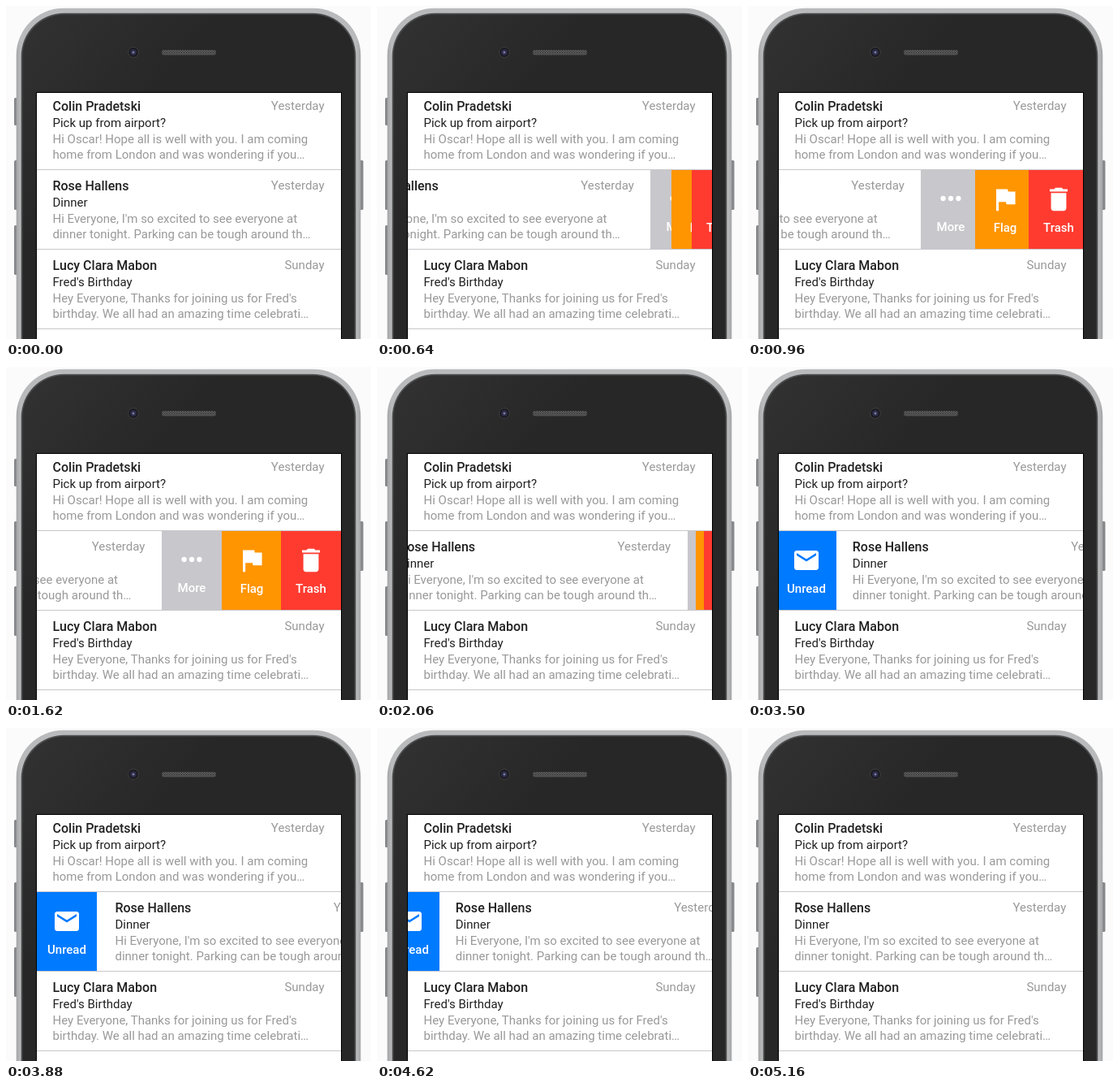
An HTML page that plays this animation: 450 by 410 pixels, repeating every 5.96 s.

```html
<!DOCTYPE html>
<html lang="en">
<head>
<meta charset="utf-8">
<title>Swipe actions</title>
<style>
html, body { margin: 0; width: 100%; height: 100%; overflow: hidden; background: #fbfbfb; }
svg { display: block; width: 450px; height: 410px; font: 15px Roboto, sans-serif; }
.name { font-size: 16px; font-weight: 500; fill: #212121; }
.subject { fill: #212121; }
.body, .date { fill: #999; }
.date { text-anchor: end; }
.label { font-weight: 500; fill: #fff; text-anchor: middle; }
</style>
</head>
<body>
<svg viewBox="0 0 450 410">
  <defs>
    <clipPath id="screen"><rect x="38" y="107" width="375" height="303"/></clipPath>
    <clipPath id="swipe"><rect x="38" y="202" width="375" height="97"/></clipPath>
    <linearGradient id="metal" x2="1" y2="0">
      <stop offset="0" stop-color="#a4a5a7"/>
      <stop offset=".012" stop-color="#b9babb"/>
      <stop offset=".988" stop-color="#b9babb"/>
      <stop offset="1" stop-color="#a4a5a7"/>
    </linearGradient>
    <linearGradient id="face" x2=".6" y2=".6">
      <stop offset="0" stop-color="#323232"/>
      <stop offset=".5" stop-color="#272727"/>
    </linearGradient>
    <pattern id="mesh" width="3" height="3" patternUnits="userSpaceOnUse">
      <rect width="3" height="3" fill="#585858"/>
      <path d="M0 0h1v1h-1zM1.5 1.5h1v1h-1z" fill="#2c2c2c"/>
    </pattern>
  </defs>
  <g fill="#85878a">
    <rect x="10" y="113" width="5" height="34" rx="1.5"/>
    <rect x="10" y="190" width="5" height="61" rx="1.5"/>
    <rect x="10" y="270" width="5" height="61" rx="1.5"/>
    <rect x="435" y="190" width="5.5" height="61" rx="1.5"/>
  </g>
  <rect x="12.7" y="2.8" width="424.6" height="480" rx="58" fill="url(#metal)"/>
  <rect x="18.7" y="8.7" width="412.6" height="480" rx="53" fill="#4a4b4c"/>
  <rect x="20.5" y="10.5" width="409" height="480" rx="51" fill="url(#face)"/>
  <circle cx="157" cy="57" r="6.3" fill="#17171a" stroke="#414145"/>
  <circle cx="157" cy="57" r="4" fill="#2b2b46"/>
  <circle cx="157" cy="57" r="1.5" fill="#7b7aa0"/>
  <rect x="192" y="54" width="67" height="6.5" rx="3.2" fill="url(#mesh)"/>
  <rect x="37" y="106" width="377" height="310"/>
  <rect x="38" y="107" width="375" height="303" fill="#fff"/>
  <g id="list" clip-path="url(#screen)"></g>
  <g id="actions" clip-path="url(#swipe)"></g>
</svg>
<script>
const LOOP = 5960, STEP = 20, SETTLE = 880;
const LEFT = 38, RIGHT = 413, BTN = 74, ROW = 98;
const list = document.getElementById('list');
const actions = document.getElementById('actions');

function add(parent, tag, attrs, text) {
  const el = document.createElementNS('http://www.w3.org/2000/svg', tag);
  for (const key in attrs) el.setAttribute(key, attrs[key]);
  if (text) el.textContent = text;
  parent.appendChild(el);
  return el;
}

const mails = [
  ['Colin Pradetski', 'Yesterday', 'Pick up from airport?',
    'Hi Oscar! Hope all is well with you. I am coming', 'home from London and was wondering if you…'],
  ['Rose Hallens', 'Yesterday', 'Dinner',
    "Hi Everyone, I'm so excited to see everyone at", 'dinner tonight. Parking can be tough around th…'],
  ['Lucy Clara Mabon', 'Sunday', "Fred's Birthday",
    "Hey Everyone, Thanks for joining us for Fred's", 'birthday. We all had an amazing time celebrati…']
];

const rows = mails.map(([name, date, subject, line1, line2], i) => {
  const y = i * ROW;
  const row = add(list, 'g');
  const put = (kind, x, base, text) => add(row, 'text', { class: kind, x, y: base + y }, text);
  put('name', 57.5, 129, name);
  put('date', 392.5, 128, date);
  put('subject', 57.5, 149, subject);
  put('body', 57.5, 169, line1);
  put('body', 57.5, 188, line2);
  add(list, 'rect', { x: LEFT, y: 201 + y, width: 375, height: 1, fill: '#c8c7cc' });
  return row;
});

const dot = x => `M${x} 10a2 2 0 1 0 0 4 2 2 0 0 0 0-4z`;
const icons = {
  more: dot(6) + dot(12) + dot(18),
  flag: 'M14.4 6L14 4H5v17h2v-7h5.6l.4 2h7V6z',
  trash: 'M6 19c0 1.1.9 2 2 2h8c1.1 0 2-.9 2-2V7H6v12zM19 4h-3.5l-1-1h-5l-1 1H5v2h14V4z',
  mail: 'M20 4H4c-1.1 0-2 .9-2 2v12c0 1.1.9 2 2 2h16c1.1 0 2-.9 2-2V6c0-1.1-.9-2-2-2zm0 4l-8 5-8-5V6l8 5 8-5v2z'
};

function button(label, icon, fill, base = 278, size = 1.57) {
  const g = add(actions, 'g');
  add(g, 'rect', { y: 202, width: BTN, height: 97, fill });
  add(g, 'path', {
    d: icons[icon], fill: '#fff',
    transform: `translate(37 ${base - 40}) scale(${size}) translate(-12 -12)`
  });
  add(g, 'text', { class: 'label', x: 37, y: base }, label);
  return g;
}

const right = [
  button('More', 'more', '#c8c7cc', 277),
  button('Flag', 'flag', '#ff9500'),
  button('Trash', 'trash', '#ff3b30')
];
const unread = button('Unread', 'mail', '#007aff', 278, 1.5);

// Each swipe springs the row to a new offset
const swipes = [
  { at: 466, to: -3 * BTN, speed: 6.6, damp: .87 },
  { at: 1606, to: 0, speed: 6.6, damp: .87 },
  { at: 3154, to: BTN, speed: 7.5, damp: .6 },
  { at: 4446, to: 0, speed: 8.5, damp: .87 }
];

// Share of the way still to go, from 1 to 0
function spring(sec, speed, damp) {
  const root = Math.sqrt(1 - damp * damp), a = speed * root * sec;
  return Math.exp(-damp * speed * sec) * (Math.cos(a) + damp / root * Math.sin(a));
}

function offset(t) {
  let x = 0;
  for (const { at, to, speed, damp } of swipes) {
    if (t < at) break;
    const rest = t - at > SETTLE ? 0 : spring((t - at) / 1000, speed, damp);
    x = to + (x - to) * rest;
  }
  return x;
}

const shift = (el, x) => el.setAttribute('transform', `translate(${x.toFixed(2)} 0)`);

function draw(ms) {
  const x = offset(Math.floor(ms % LOOP / STEP) * STEP);
  shift(rows[1], x);
  const open = Math.max(0, -x);
  right.forEach((b, i) => shift(b, Math.round(RIGHT - open * (3 - i) / 3)));
  shift(unread, LEFT - BTN + Math.round(Math.min(BTN, Math.max(0, x))));
}

let start;
function tick(now) {
  start ??= now;
  draw(now - start);
  requestAnimationFrame(tick);
}
draw(0);
requestAnimationFrame(tick);
</script>
</body>
</html>
```
